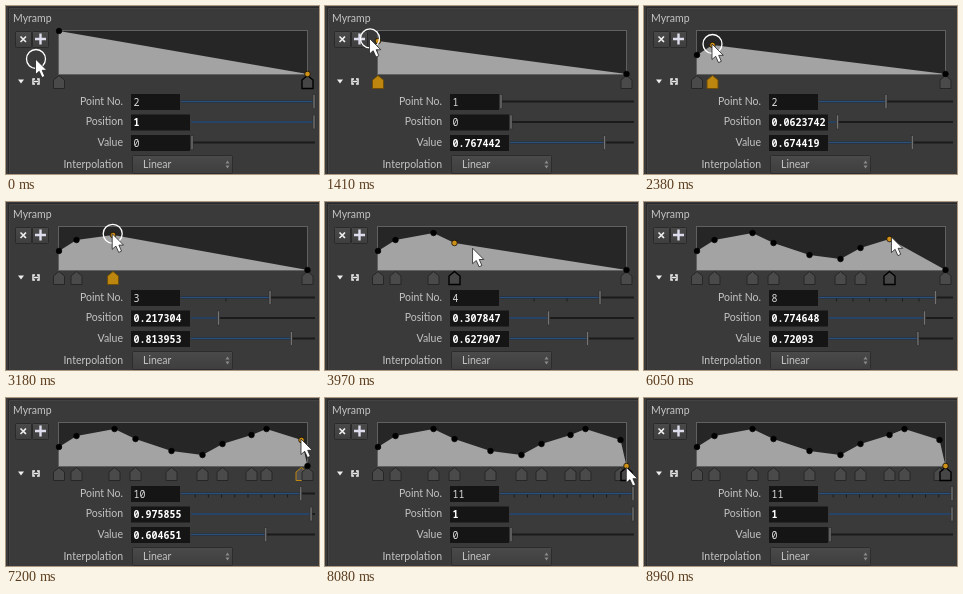
These frames come from a looping animation (313 by 168 pixels, 9.57 s). An HTML page:

```html
<!DOCTYPE html>
<html lang="en">
<head>
<meta charset="utf-8">
<title>Ramp editor</title>
<style>
  html, body { margin: 0; width: 100%; height: 100%; overflow: hidden; background: #3a3a3a; }
  svg { display: block; width: 313px; height: 168px; }
  text { font: 10.5px Lato, "Open Sans", sans-serif; fill: #c4c4c4; }
  .num { font: 10px "Noto Sans Mono", "DejaVu Sans Mono", monospace; fill: #ddd; }
  .bold { font-weight: 700; fill: #fff; }
</style>
</head>
<body>
<svg viewBox="0 0 313 168">
  <defs>
    <linearGradient id="raised" x2="0" y2="1">
      <stop stop-color="#4a4a4a"/><stop offset="1" stop-color="#3e3e3e"/>
    </linearGradient>
  </defs>
  <rect width="313" height="168" fill="#3a3a3a"/>
  <path d="M2.5 168V1.5H313" fill="none" stroke="#292929"/>
  <path d="M3.5 168V2.5H313" fill="none" stroke="#434343"/>
  <text x="7" y="16">Myramp</text>

  <g fill="url(#raised)" stroke="#2a2a2a">
    <rect x="9.5" y="25.5" width="16" height="16" rx="1"/>
    <rect x="26.5" y="25.5" width="16" height="16" rx="1"/>
  </g>
  <path d="M14.5 30.5l5.5 5.5m0-5.5l-5.5 5.5" stroke="#eee" stroke-width="1.6"/>
  <path d="M34.5 27.5v11m-5.5-5.5h11" stroke="#dcdcec" stroke-width="2.4"/>
  <path d="M12 73.5h6l-3 4z" fill="#eee"/>
  <path d="M29 73h-2v5h2m2-5h2v5h-2M28 75.5h4" fill="none" stroke="#eee" stroke-width="1.5"/>

  <rect x="52.5" y="24.5" width="249" height="44" fill="#262626" stroke="#606060"/>
  <path id="fill" fill="#a3a3a3"/>
  <g id="handles"></g>
  <g id="dots"></g>
  <g id="fields"></g>

  <text x="117" y="162" text-anchor="end">Interpolation</text>
  <rect x="126.5" y="149.5" width="100" height="18" rx="1" fill="url(#raised)" stroke="#2c2c2c"/>
  <text x="137" y="162">Linear</text>
  <path d="M219.5 157.5h4l-2-3zm0 2h4l-2 3z" fill="#8a8a8a"/>

  <g id="pointer">
    <circle id="ring" r="9.5" fill="none" stroke="#fff" stroke-width="1.3"/>
    <path d="M-.5 0V15.5L3.2 12.3L6 18.6L8.8 17.3L6.2 11.3H10.8Z" fill="#fff" stroke="#222" stroke-width=".8"/>
  </g>
</svg>
<script>
const LOOP = 9570, STEP = 87.8;
const LEFT = 53, COLUMNS = 497, BASE = 68, ROWS = 43;
const TRAVEL = 5, SELECT_END = 87;
const ORANGE = '#bd860f';
const $ = id => document.getElementById(id);
const mix = (a, b, u) => a + (b - a) * u;
const clamp = (v, low, high) => Math.max(low, Math.min(high, v));
const toScreen = ([column, row]) => [LEFT + column / 2, BASE - row];

// Each point in ramp units, with the spot where its drag starts if it is dragged.
const END = [COLUMNS, 0];
const edits = [
  { to: [-16, 19], from: [-16, 43] },
  { to: [35, 30], from: [27, 28] },
  { to: [111, 37], from: [107, 35] },
  { to: [153, 27], from: [138, 30] },
  { to: [225, 15] },
  { to: [287, 11] },
  { to: [327, 22] },
  { to: [385, 31] },
  { to: [415, 37] },
  { to: [485, 26] },
  { to: END }
].map(({ to, from = to }, i) => {
  const careful = i < 3;   // the first drags are slow, then the pace picks up
  const press = to === END ? SELECT_END : careful ? 14 + 10.5 * i : 41 + 6.3 * (i - 3);
  return { to, from, press, release: press + (careful ? 5 : 1.6) };
});

// Cursor stops as [step, x, y], built from the edits.
const stops = [[0, 30, 54], [2, 30, 54], [7, 62, 58]];
edits.forEach(({ press, release, from, to }, i) => {
  const last = stops[stops.length - 1];
  if (i) stops.push([Math.max(last[0], press - TRAVEL), last[1], last[2]]);
  stops.push([press, ...toScreen(from)], [release, ...toScreen(to)]);
});
stops.push([91, ...toScreen(END)], [102, 313, 169]);

function cursorAt(step) {
  const i = stops.findIndex(s => s[0] > step);
  if (i < 0) return stops[stops.length - 1].slice(1);
  const [t0, x0, y0] = stops[i - 1], [t1, x1, y1] = stops[i];
  const u = (step - t0) / (t1 - t0), eased = u * u * (3 - 2 * u);
  return [mix(x0, x1, eased), mix(y0, y1, eased)];
}

function rampAt(step) {
  const done = edits.filter(e => step >= e.press);
  const points = done.filter(e => e.to !== END).map(({ from, to, press, release }) => {
    const u = clamp((step - press) / (release - press), 0, 1);
    return [0, 1].map(k => Math.max(0, Math.round(mix(from[k], to[k], u))));
  });
  if (!points.length) points.push([0, ROWS]);
  points.push(END);
  const selected = done.length ? done.length - 1 : points.length - 1;
  return { points, selected, pressed: done.some(e => step < e.release) };
}

const handleStyles = {
  idle: ['#4a4a4a', '#262626', 1],
  selected: ['#464646', '#000', 1.4],
  hover: ['#505050', ORANGE, 1],
  drag: [ORANGE, '#6d4d08', 1]
};

function handle(x, state) {
  const [fill, stroke, width] = handleStyles[state];
  return `<path d="M${x} 69.5l5.5 4.5v8.5h-11v-8.5z" fill="${fill}" stroke="${stroke}" stroke-width="${width}"/>`;
}

const dot = ([x, y], on) =>
  `<circle cx="${x}" cy="${y}" r="2.8" fill="${on ? '#cf9016' : '#000'}" stroke="#000" stroke-width=".7"/>`;

function field(row, label, value, boxRight, ratio, bold, count = 0) {
  const y = 87.5 + 20.5 * row, start = boxRight + 2, x = mix(start, 308, ratio);
  let ticks = '';
  for (let i = 1; i < count - 1; i++)
    ticks += `M${mix(start, 308, i / (count - 1))} ${y + 9}v3`;
  return `<text x="117" y="${y + 11}" text-anchor="end">${label}</text>
    <rect x="125" y="${y + .5}" width="${boxRight - 125}" height="16" fill="#151515"/>
    <text class="num${bold ? ' bold' : ''}" x="127.5" y="${y + 12}">${value}</text>
    <path d="M${boxRight + 1} ${y + 8}H309" stroke="#1b1b1b" stroke-width="2"/>
    <path d="M${boxRight + 1} ${y + 8}H${x}" stroke="#2b527f" stroke-width="1.4"/>
    <path d="${ticks}" stroke="#1b1b1b"/>
    <rect x="${x - 1}" y="${y + 1}" width="2" height="14" fill="#747474" stroke="#2a2a2a" stroke-width=".6"/>`;
}

function draw(time) {
  const step = Math.floor(time / STEP + .2);
  const { points, selected, pressed } = rampAt(step);
  const spots = points.map(toScreen);
  const [x, y] = cursorAt(step);
  const [dotX, dotY] = spots[selected];
  const hovered = Math.hypot(x - dotX, y - dotY) < 1.5;
  const state = pressed ? 'drag' : hovered ? 'hover' : 'selected';
  const position = points[selected][0] / COLUMNS, value = points[selected][1] / ROWS;
  const number = v => Number(v.toPrecision(6));

  $('fill').setAttribute('d', `M${LEFT} ${BASE}L${spots.join('L')}V${BASE}Z`);
  $('handles').innerHTML = spots.map((p, i) => handle(p[0], i === selected ? state : 'idle')).join('');
  $('dots').innerHTML = spots.map((p, i) => dot(p, i === selected)).join('');
  $('fields').innerHTML =
    field(0, 'Point No.', selected + 1, 174, selected / (points.length - 1), false, points.length) +
    field(1, 'Position', number(position), 184, position, position > 0) +
    field(2, 'Value', number(value), 184, value, value > 0);

  $('pointer').setAttribute('transform', `translate(${x} ${y - 1})`);
  $('ring').style.display = pressed || step < 1 ? '' : 'none';
}

const begin = performance.now();
function tick() {
  draw((performance.now() - begin) % LOOP);
  requestAnimationFrame(tick);
}
tick();
</script>
</body>
</html>
```
